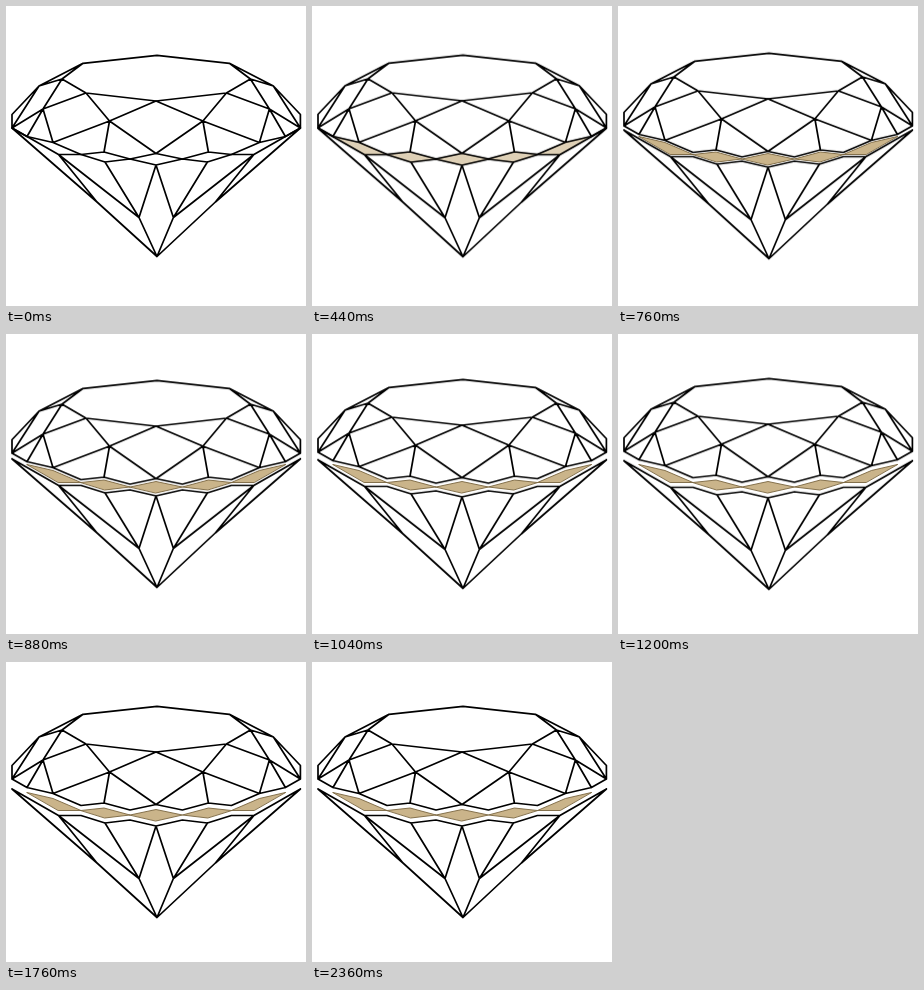
Recreate the animation shown at these times as an HTML page. Size 300 by 300 pixels, loop 2.4 s.

```html
<!DOCTYPE html>
<html lang="en">
<head>
<meta charset="utf-8">
<title>Diamond</title>
<style>
html, body { margin: 0; width: 100%; height: 100%; overflow: hidden; background: #fff; }
svg { display: block; width: 100vw; height: 100vh; }
path { stroke-linejoin: round; stroke-linecap: round; }
#crown, #base { fill: none; stroke: #000; stroke-width: 1.7; }
#girdle { fill: #cab48a; stroke: #7a6640; stroke-width: .9; }
</style>
</head>
<body>
<svg viewBox="0 0 300 300">
  <path id="girdle"/>
  <path id="crown"/>
  <path id="base"/>
</svg>
<script>
const LOOP = 2400;
const AXIS = 150.2;
const $ = id => document.getElementById(id);
// Points on the centre line belong to both halves.
const flip = line => line.map(([x, y]) => [x > 149 ? x : 2 * AXIS - x, y]);
const path = line => 'M' + line.map(p => p.join(' ')).join('L');
const both = lines => lines.map(l => path(l) + path(flip(l))).join('');

// Left half of the stone; the right half is mirrored.
const back = [151, 49.3], backLeft = [77, 57.3], left = [56, 73];
const frontLeft = [80, 87], front = [150, 95];
const starBack = [33, 80], starSide = [37, 103], starFront = [103.5, 115];
const edge = [6, 122], rim = [6, 108.5];
const joints = [[21, 130.5], [75, 148.5], [124, 153]];
const tops = [[47, 136.5], [98, 146], [150, 147.5]];
const bottoms = [[52.5, 148.5], [99, 156], [150, 159]];
const apex = [151, 250.5], tipFront = [133, 211.5], tipSide = [91, 196];

const zigzag = peaks => [edge, ...joints.flatMap((j, i) => [j, peaks[i]])];

$('crown').setAttribute('d', both([
  [back, backLeft, left, frontLeft, front],
  [backLeft, starBack, rim, edge],
  [edge, starBack, left, starSide, frontLeft, starFront, front],
  [edge, starSide, joints[0]],
  [starSide, tops[0], starFront, tops[1]],
  [starFront, tops[2]],
  zigzag(tops)
]));

$('base').setAttribute('d', both([
  zigzag(bottoms),
  [edge, tipSide, apex, tipFront, bottoms[2]],
  [bottoms[1], tipFront, bottoms[0], tipSide]
]));

const facet = i => [joints[i], tops[i], joints[i + 1], bottoms[i]];
const middle = [joints[2], tops[2], flip([joints[2]])[0], bottoms[2]];
$('girdle').setAttribute('d',
  [facet(0), facet(1), flip(facet(0)), flip(facet(1)), middle]
    .map(l => path(l) + 'Z').join(''));

// Each step: [time in ms, value].
const spread = [[0, 0], [400, 0], [1240, 5], [LOOP, 5]];
const fade = [[0, 0], [120, 0], [640, 1], [LOOP, 1]];

function play(id, steps, style) {
  $(id).animate(
    steps.map(([t, v]) => ({ offset: t / LOOP, ...style(v) })),
    { duration: LOOP, iterations: Infinity });
}

play('crown', spread, d => ({ transform: `translateY(${-d}px)` }));
play('base', spread, d => ({ transform: `translateY(${d}px)` }));
play('girdle', fade, opacity => ({ opacity }));
</script>
</body>
</html>
```
